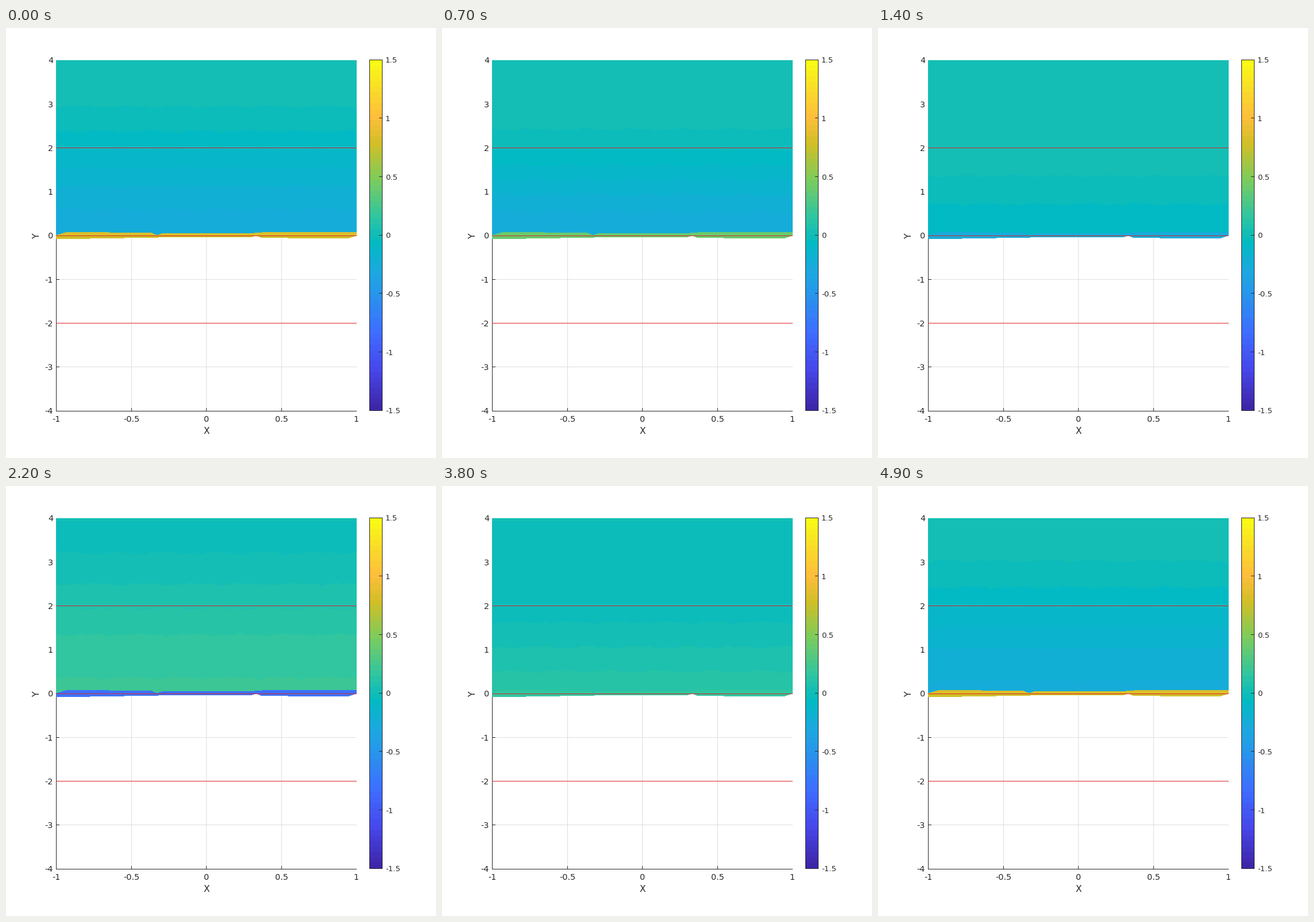
A matplotlib script that plays this animation: 748x748 px, repeating every 5000 ms.

```python
import numpy as np
import matplotlib.pyplot as plt
from matplotlib.animation import FuncAnimation
from matplotlib.colors import LinearSegmentedColormap

SIZE, FRAMES, INTERVAL = 748, 50, 100
LEFT, RIGHT, ZERO, UNIT = 87.5, 609.5, 361, 76.25
TOP, BOTTOM = ZERO - 4 * UNIT, ZERO + 4 * UNIT
BAR_LEFT, BAR_RIGHT, BAR_TOP, BAR_BOTTOM = 632, 654, 55, 665
PX = 0.72  # points per pixel at 100 dpi
INK, GRID, RED = (.15,) * 3, (.87,) * 3, (.87, .14, .16)

STOPS = {0: "#3E26A8", 7: "#4747EB", 14: "#3E6FFF", 21: "#2797EB",
         25: "#1CA9DF", 30: "#02BAC3", 35: "#31C69F", 42: "#81CC59",
         48: "#D1BF27", 53: "#FEBE3C", 57: "#FAD62D", 63: "#F9FB15"}
CMAP = LinearSegmentedColormap.from_list(
    "blue_yellow", [(k / 63, c) for k, c in STOPS.items()], N=64)

# Outline of the thin layer around y = 0: (x, pixels below the zero line)
UPPER = [(-1, 0), (-.93, -5.5), (-.37, -4.5), (-.33, 0), (-.29, -3.5),
         (.3, -3.5), (.37, -5), (1, -6)]
LOWER = [(-1, 6), (-.32, 3), (.29, 3), (.335, 0), (.37, 3.7), (.94, 4.7),
         (1, 0)]


def px_x(x):
    return LEFT + (x + 1) * (RIGHT - LEFT) / 2


def px_y(y):
    return ZERO - y * UNIT


def level(value):
    return np.clip(np.floor((value + 1.5) / 3 * 64), 0, 63).astype(int)


fig = plt.figure(figsize=(SIZE / 100, SIZE / 100), dpi=100, facecolor="white")
ax = fig.add_axes([0, 0, 1, 1])


def line(xs, ys, color=INK, z=1):
    """One-pixel line centred on whole pixels."""
    ax.plot(np.floor(xs) + .5, np.floor(ys) + .5, color=color, lw=PX,
            zorder=z, snap=False, solid_capstyle="projecting")


def label(x, y, text, size, ha="center"):
    ax.text(x, y + .365 * size, text, fontsize=size * PX, color=INK, ha=ha,
            va="baseline", family="DejaVu Sans")


def strip(points):
    outline = [(px_x(x), ZERO + d) for x, d in [(-1, 0), *points, (1, 0)]]
    return ax.fill(*zip(*outline), lw=0, zorder=3, antialiased=False)[0]


# Axes, grid and reference lines
for x in np.arange(-1, 1.1, .5):
    label(px_x(x), 680, f"{x:g}", 14.4)
    if abs(x) < 1:
        line([px_x(x)] * 2, [ZERO, BOTTOM], GRID, 0)
        line([px_x(x)] * 2, [BOTTOM - 5, BOTTOM])
for y in range(-4, 5):
    label(82, px_y(y), str(y), 14.4, "right")
    if -4 < y < 0:
        line([LEFT, RIGHT], [px_y(y)] * 2, GRID, 0)
        line([LEFT, LEFT + 5], [px_y(y)] * 2)
    if y in (-2, 0, 2):
        line([LEFT, RIGHT], [px_y(y)] * 2, RED, 5)
line([LEFT, LEFT, RIGHT], [ZERO, BOTTOM, BOTTOM])
label(348.5, 700, "X", 15.5)
ax.text(53.5, 361, "Y", fontsize=15.5 * PX, color=INK, rotation=90,
        ha="center", va="center", family="DejaVu Sans")

# Colour bar
ax.imshow(np.arange(64)[::-1, None] + .5, cmap=CMAP, vmin=0, vmax=64,
          extent=(BAR_LEFT, BAR_RIGHT, BAR_BOTTOM, BAR_TOP),
          interpolation="nearest", zorder=1)
line([BAR_LEFT, BAR_RIGHT, BAR_RIGHT, BAR_LEFT, BAR_LEFT],
     [BAR_TOP, BAR_TOP, BAR_BOTTOM, BAR_BOTTOM, BAR_TOP], z=3)
for i, y in enumerate(np.linspace(BAR_BOTTOM, BAR_TOP, 7)):
    line([BAR_RIGHT - 5, BAR_RIGHT], [y, y], z=3)
    label(660, y + .5, f"{i / 2 - 1.5:g}", 13.2, "left")

# Slightly uneven heights give the ragged edges between bands
gx, gy = np.meshgrid(np.linspace(-1, 1, 523), np.linspace(4, 0, 305))
rough = (.018 * np.sin(19 * gx + 5 * gy) + .014 * np.sin(47 * gx - 9 * gy)
         + .012 * np.sin(83 * gx + 13 * gy))
h = np.clip(gy + rough, 0, 4)
cos_part = (4 - h) * (2.95 - h) * (.022 + .0122 * h)
sin_part = (4 - h) * (1.73 - h) * (.0205 + .0125 * np.sin(np.pi * h / 4))
rim = gy > 3.94

field = ax.imshow(np.zeros(gx.shape), cmap=CMAP, vmin=0, vmax=64,
                  extent=(87, 610, ZERO, TOP), interpolation="nearest",
                  zorder=2)
upper, lower = strip(UPPER), strip(LOWER)

ax.set(xlim=(0, SIZE), ylim=(SIZE, 0), aspect="auto")
ax.axis("off")


def update(frame):
    phase = 2 * np.pi * frame / FRAMES
    value = -(cos_part * np.cos(phase) + sin_part * np.sin(phase))
    value[rim] = 0
    field.set_data(level(value) + .5)
    layer = .826 * np.cos(phase + np.radians(9))
    upper.set_facecolor(CMAP(int(level(layer))))
    lower.set_facecolor(CMAP(int(level(.95 * layer))))
    return field, upper, lower


anim = FuncAnimation(fig, update, frames=FRAMES, interval=INTERVAL,
                     repeat=True, repeat_delay=0)
plt.show()
```
